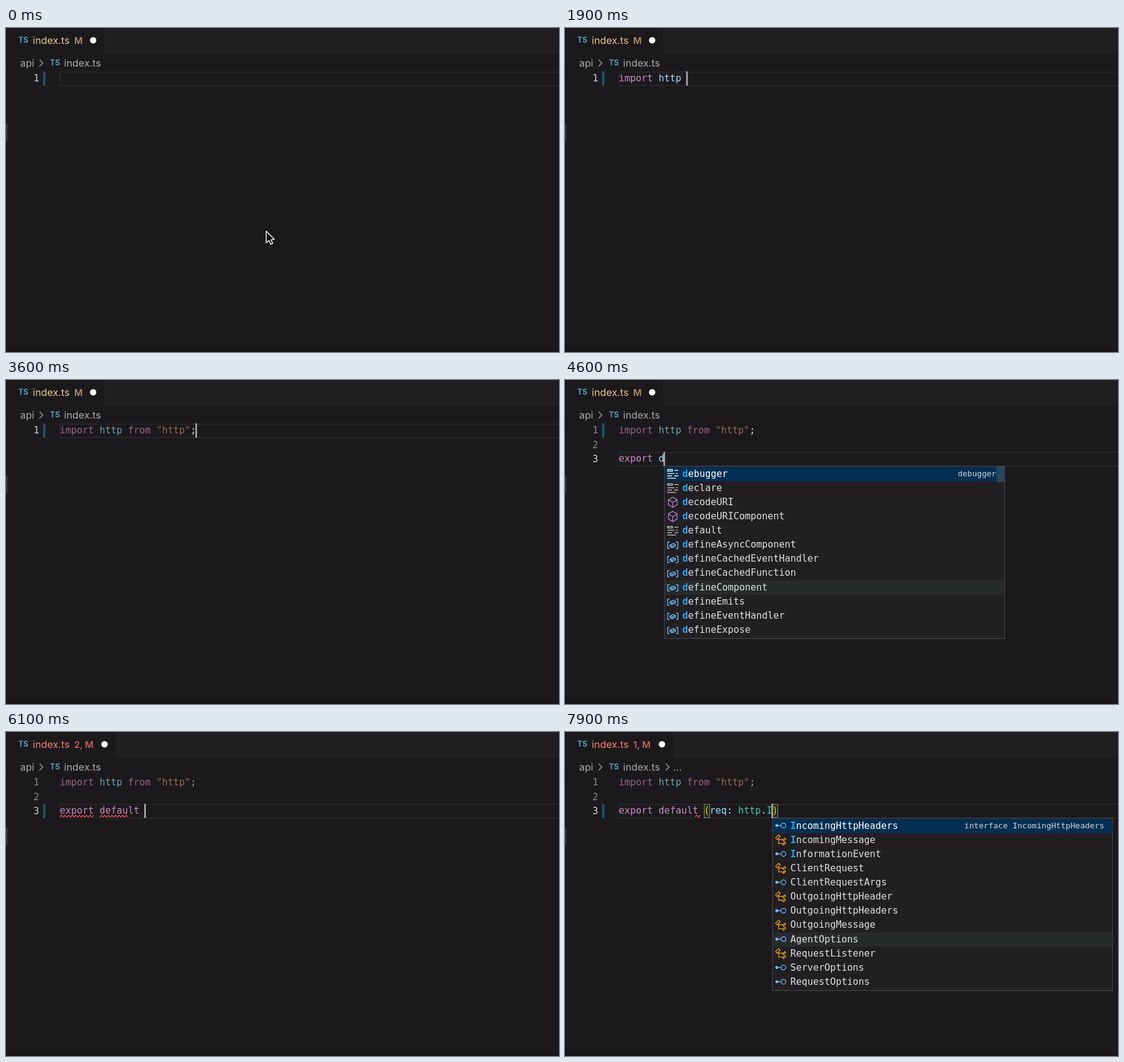
An HTML page for the animation above (8000 ms loop, 900 by 528 pixels).

```html
<!DOCTYPE html>
<html lang="en">
<head>
<meta charset="utf-8">
<title>Typing in an editor</title>
<style>
html, body { margin: 0; width: 100%; height: 100%; overflow: hidden; background: #1b191c; }
svg { display: block; width: 900px; height: 528px; }
text { white-space: pre; }
.ui { font: 16.3px Inter, "Open Sans", sans-serif; }
.badge { font: 600 15px Inter, "Open Sans", sans-serif; }
.ts { font: 700 12.5px Inter, "Open Sans", sans-serif; fill: #519aba; }
.code { font: 15.36px "DejaVu Sans Mono", monospace; }
.detail { font: 13.05px "DejaVu Sans Mono", monospace; text-anchor: end; }
.hit { font-weight: 700; fill: #2aa4f8; }
</style>
</head>
<body>
<svg viewBox="0 0 900 528">
  <defs>
    <pattern id="hatch" width="2.6" height="2.6" patternUnits="userSpaceOnUse" patternTransform="rotate(-45)">
      <rect width="2.6" height="1.2" fill="#2391bd"/>
    </pattern>
  </defs>
  <g id="scene"></g>
</svg>
<script>
const LOOP = 8000;
const CHAR = 9.247, LEFT = 87.5, LINE = 23.1, TOP = 71;
const POPUP_WIDTH = 553.5, ROW = 23.14, HOVER_Y = 338;

// Typing: start, delay between keys, keys
const RUNS = [
  [600, 100, 'im'], [1050, 85, 'port http '], [2000, 100, 'from "ht'],
  [2900, 0, 'tp'], [3200, 0, '"'], [3500, 0, ';'],
  [3700, 100, '\n\nexport d'], [4700, 100, 'efau'], [5600, 0, 'lt'], [5800, 0, ' '],
  [6300, 100, '(req'], [7000, 100, ': http'], [7600, 0, '.'], [7800, 0, 'I']
];
const KEYS = RUNS.flatMap(([start, step, keys]) =>
  [...keys].map((key, i) => ({ at: start + i * step, key })));

const POPUP_AT = 800, UNUSED_AT = 3300, ERRORS_AT = 5200, RECHECK_AT = 6400;
const KEYWORDS = ['import', 'from', 'export', 'default'];

// Stroked icons on a 16 unit grid
const ICONS = {
  k: ['#d0d0d0', 'M10 3.5h5M1 7.5h9M12 7.5h2M1 10.5h6M10 10.5h5M1 13.5h11M1.5 2.5h6v2h-6z'],
  m: ['#b180d7', 'M8 1.4L13.5 4.7V11.2L8 14.4 2.5 11.2V4.7zM2.5 4.9L8 7.8l5.5-2.9M8 7.8v6.6'],
  v: ['#75beff', 'M4 4.5H1.5v8H4M12 4.5h2.5v8H12M4.5 8L9 6l2.5 1.5v2l-4.5 2L4.5 10zM4.5 8L7 9.4l4.5-2M7 9.4v2'],
  s: ['#dcdcdc', 'M2.5 13V1.5h12V13M2 14.5h1m1 0h1m1 0h1m1 0h1m1 0h1m1 0h1m1 0h1'],
  e: ['#ee9d28', 'M7.5 6V2.5h7v6h-4M9 4.5h4M9 6.5h4M1.5 7.5h7v6h-7zM3 9.5h4M3 11.5h4'],
  i: ['#75beff', 'M8.5 7.5a3 3 0 1 1 6 0a3 3 0 1 1-6 0M3 7.5h5.5M1.6 7.5a1.4 1.4 0 1 1 2.8 0a1.4 1.4 0 1 1-2.8 0M2.5 7.5a.5.5 0 1 1 1 0a.5.5 0 1 1-1 0'],
  c: ['#ee9d28', 'M1.4 5.4l4-4 2 2-4 4zM5.4 5.4v6.9h5M5.4 7.3h5.4M10.4 8l2.7-2.6 1.2 1.2-2.7 2.7zM10.4 13l2.7-2.6 1.2 1.2-2.7 2.7z']
};

const parseList = source => source.split(',').map(entry => {
  const [label, detail = ''] = entry.slice(2).split('>');
  return { icon: entry[0], label, detail };
});
const LISTS = {
  i: 'k implements>implements,k import,m importScripts,s import>Import Statement,v Image,v ImageBitmap,v ImageBitmapRenderingContext,v ImageData,e ImportsNotUsedAsValues>typescript,v isMethod,v isMainThread>worker_threads,m isMap>util/types',
  h: 'v http>module http,v https,v http2,v history,v History,v HashChangeEvent,v Headers,v HTMLElement,v HTMLDivElement,v HTMLInputElement,v HTMLImageElement,m hasInjectionContext',
  f: 'k from>from,k function,k for,k false,k finally,m fetch,v File,v FileList,v FileReader,v FormData,v frames,v Function',
  '"h': 'v http>http,v http2,v https,v html-tags,v html-void-elements,v htmlparser2,v h3,v hookable,v has-flag,v hash-sum,v hasha,v he',
  e: 'k export>export,k else,k enum,k extends,m encodeURI,m encodeURIComponent,m eval,v Error,v Event,v EventSource,v EventTarget,v exports',
  d: 'k debugger>debugger,k declare,m decodeURI,m decodeURIComponent,k default,v defineAsyncComponent,v defineCachedEventHandler,v defineCachedFunction,v defineComponent,v defineEmits,v defineEventHandler,v defineExpose',
  r: 'm require>function require,v Request,m requestAnimationFrame,m requestIdleCallback,v ReadableStream,m reactive,m readonly,m ref,v Reflect,v RegExp,m reportError,v Response',
  '.': 'i IncomingHttpHeaders>interface IncomingHttpHeaders,c IncomingMessage,i InformationEvent,c ClientRequest,i ClientRequestArgs,c OutgoingHttpHeader,i OutgoingHttpHeaders,c OutgoingMessage,i AgentOptions,c RequestListener,i ServerOptions,i RequestOptions'
};
for (const key in LISTS) LISTS[key] = parseList(LISTS[key]);

const rect = (x, y, w, h, attrs) => `<rect x="${x}" y="${y}" width="${w}" height="${h}" ${attrs}/>`;
const text = (x, y, cls, fill, content, attrs = '') =>
  `<text x="${x}" y="${y}" class="${cls}" fill="${fill}" ${attrs}>${content}</text>`;
const path = (d, color, width, attrs = '') =>
  `<path d="${d}" fill="none" stroke="${color}" stroke-width="${width}" ${attrs}/>`;
const columnX = column => LEFT + column * CHAR;
const lineY = row => TOP + row * LINE;
const chevron = x => path(`M${x} 51.5l5.5 5.5-5.5 5.5`, '#a5a5a5', 1.3);

function header(errors, symbols) {
  const badge = errors ? `${errors}, M` : 'M';
  const shift = [0, 16, 18.5][errors];
  return rect(0, 0, 900, 42, 'fill="#211f22"') + rect(0, 0, 160 + shift, 42.5, 'fill="#1b191c"')
    + text(20, 24.3, 'ts', '', 'TS')
    + text(43.5, 26, 'ui', errors ? '#f87f70' : '#eec490', 'index.ts')
    + text(111, 25.8, 'badge', errors ? '#c4605a' : '#ad8f6b', badge)
    + `<circle cx="${141.8 + shift}" cy="20" r="5.2" fill="#fff"/>`
    + text(23, 63, 'ui', '#a9a9a9', 'api') + chevron(54.5) + text(71.5, 61, 'ts', '', 'TS')
    + text(94.5, 63, 'ui', '#a9a9a9', 'index.ts')
    + (symbols ? chevron(164) + text(176, 63, 'ui', '#a9a9a9', '...') : '');
}

function frameEdges() {
  return rect(0, 0, 2, 528, 'fill="#171618"') + rect(0, 71, 2, 1, 'fill="#39383a"')
    + rect(0, 156, 2.5, 28, 'fill="#38373a"') + rect(0, 524, 900, 4, 'fill="#18141a"');
}

function tokenColor(token, before) {
  if (token[0] === '"') return '#ce9178';
  if (KEYWORDS.includes(token)) return '#cb88c6';
  if (/[()]/.test(token)) return '#ffd700';
  if (/\w/.test(token)) return before.includes(':') ? '#4ec9b0' : '#9cdcfe';
  return '#dcdcdc';
}

function codeLine(line, row, t) {
  let out = '';
  for (const match of line.matchAll(/"[^"]*"?|\w+|[^\s\w]/g)) {
    const [token] = match;
    const unused = row === 0 && t >= (token === ';' ? ERRORS_AT : UNUSED_AT);
    out += text(columnX(match.index), lineY(row) + 16.2, 'code',
      tokenColor(token, line.slice(0, match.index)), token, unused ? 'opacity=".67"' : '');
  }
  return out;
}

function squiggle(from, to, row) {
  const y = lineY(row) + 21.2;
  let d = `M${from} ${y}`;
  for (let x = from, up = true; x + 2.9 <= to + 1; x += 2.9, up = !up) d += `l2.9 ${up ? -2.6 : 2.6}`;
  return path(d, '#f14c4c', 1.3, 'stroke-linejoin="round"');
}

function bracketBox(column, row) {
  return rect(columnX(column) + .5, lineY(row) + .8, CHAR - .6, 21.6,
    'fill="#1b2a1b" stroke="#808080" stroke-width="1.1"');
}

// Columns of the typed letters inside a label, or null
function matchLetters(label, word) {
  const lower = label.toLowerCase(), hits = [];
  for (const letter of word.toLowerCase()) {
    const at = lower.indexOf(letter, hits.length ? hits.at(-1) + 1 : 0);
    if (at < 0 || (!hits.length && at > 0)) return null;
    hits.push(at);
  }
  return hits;
}

function suggestions(line, t) {
  const word = line.match(/\w*$/)[0];
  const lead = line.at(-word.length - 1);
  if (t < POPUP_AT || KEYWORDS.includes(word)) return null;
  if (!word && !line.endsWith('.')) return null;
  if (lead === '"' && word.length > 2) return null;
  const first = word.slice(0, 1).toLowerCase();
  const key = line.includes('.') ? '.' : lead === '"' ? '"' + first : first;
  const list = LISTS[key];
  if (!list) return null;
  const items = word.length > 1 ? list.filter(item => matchLetters(item.label, word)) : list;
  return { items, word, scrolls: items.length === 12 && key !== '.' };
}

function popup({ items, word, scrolls }, column, row) {
  const x = columnX(column) + .5, y = lineY(row + 1) + .4;
  const height = items.length * ROW + 3;
  let out = rect(x, y, POPUP_WIDTH, height, 'fill="#211f22" stroke="#454447" stroke-width="1.2"');
  items.forEach(({ icon, label, detail }, i) => {
    const rowY = y + 1 + i * ROW, selected = i === 0;
    const hovered = rowY <= HOVER_Y && HOVER_Y < rowY + ROW;
    if (selected || hovered)
      out += rect(x + .6, rowY, POPUP_WIDTH - 1.2, ROW, `fill="${selected ? '#042f52' : '#272a2b'}"`);
    const [color, d] = ICONS[icon];
    out += path(d, selected && icon === 'k' ? '#fff' : color, 1,
      `transform="translate(${x + 3.2} ${rowY + 1.1}) scale(1.28)"`);
    const hits = matchLetters(label, word) || [];
    const letters = [...label].map((c, n) => hits.includes(n) ? `<tspan class="hit">${c}</tspan>` : c).join('');
    out += text(x + 29, rowY + 15.8, 'code', selected ? '#fff' : '#e0e0e0', letters);
    if (detail) out += text(x + 540, rowY + 15, 'detail', selected ? '#ced6dd' : '#a3a2a5', detail);
  });
  if (scrolls) out += rect(x + 540, y + .5, 13, 25, 'fill="#797979" opacity=".3"');
  return out;
}

function draw(t) {
  const typed = KEYS.filter(key => key.at <= t);
  const lines = typed.map(key => key.key).join('').split('\n');
  const row = lines.length - 1, line = lines[row], column = line.length;
  const lastKey = typed.length ? typed.at(-1).at : -900;
  const errors = t < ERRORS_AT ? 0 : t < RECHECK_AT ? 2 : 1;
  const y = lineY(row);

  const shown = [...lines];
  const openParen = line.indexOf('(');
  if (line.split('"').length === 2) shown[row] += '"';
  if (openParen >= 0) shown[row] += ')';

  let out = header(errors, t >= RECHECK_AT) + frameEdges();
  out += rect(88, y + .8, 830, 22, 'fill="none" stroke="#29272a" stroke-width="1.8"');
  out += rect(60.3, lineY(errors ? 2 : 0), 4, 23, 'fill="url(#hatch)"');
  if (openParen >= 0) out += bracketBox(openParen, row) + bracketBox(column, row);

  shown.forEach((content, i) => {
    out += text(54, lineY(i) + 16.4, 'code', i === row ? '#d0d0d0' : '#88878a', i + 1, 'text-anchor="end"');
    out += codeLine(content, i, t);
  });

  if (errors === 2) out += squiggle(columnX(0), columnX(6), 2) + squiggle(columnX(7), columnX(12), 2);
  if (errors === 1) out += squiggle(211.5, 220.5, 2);
  if ((t - lastKey) % 1000 < 500) out += rect(columnX(column) - 1.2, y - .3, 2.5, 23.3, 'fill="#aeafad"');

  const list = suggestions(line, t);
  if (list && list.items.length) out += popup(list, column, row);
  if (!typed.length)
    out += '<path d="M423.5 331v19l4.4-3.8 2.9 6.3 3.3-1.5-2.8-5.9 5.4-.6z" fill="#111" stroke="#fff" stroke-width="1.4" stroke-linejoin="round"/>';
  return out;
}

const scene = document.getElementById('scene');
let current = '';
function tick() {
  const next = draw(performance.now() % LOOP);
  if (next !== current) scene.innerHTML = current = next;
  requestAnimationFrame(tick);
}
tick();
</script>
</body>
</html>
```
